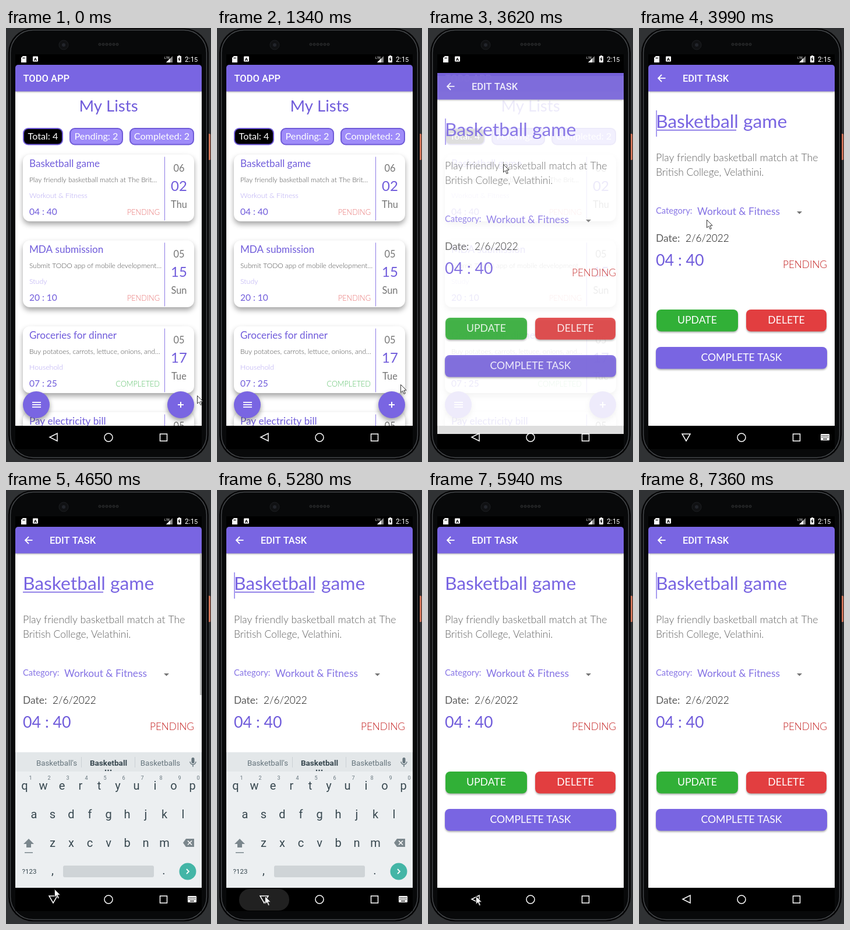
Animation of 352 by 743 pixels, one loop 7.64 s. Source, as an HTML page with a canvas:

```html
<!DOCTYPE html>
<html lang="en">
<head>
<meta charset="utf-8">
<title>Todo app</title>
<style>
html, body { margin: 0; width: 100%; height: 100%; overflow: hidden; background: #303234; }
canvas { display: block; width: 352px; height: 743px; }
</style>
</head>
<body>
<canvas id="stage"></canvas>
<script>
const W = 352, H = 743, LOOP = 7640;
const canvas = document.getElementById('stage');
const c = canvas.getContext('2d');
const ratio = window.devicePixelRatio || 1;
canvas.width = W * ratio;
canvas.height = H * ratio;

const PURPLE = '#7965e2', INK = '#705cdb', GRAY = '#757575';
const HAND = 'Lato, sans-serif', UI = 'Roboto, sans-serif';

// Pointer stops: [time, x, y]; the pointer jumps from one to the next.
const POINTER = [
  [0, 328, 629], [820, 326, 629], [970, 323, 629], [1340, 315, 610],
  [1460, 302, 560], [1610, 270, 470], [1890, 215, 360], [2010, 175, 290],
  [2320, 140, 240], [2470, 129, 233], [3860, 122, 290], [3990, 116, 328],
  [4130, 104, 440], [4260, 94, 560], [4410, 86, 650], [4530, 83, 683],
  [4770, 83, 690], [4920, 82, 695], [6740, 340, 718], [6860, 400, 800]
];
// Stages of the sliding layers: [time, opacity, offset].
const SHEET = [[3620, 0.87, 14], [3740, 0.97, 4], [3860, 1, 0]];
const KEYS = [[4130, 0.6, 22], [4260, 1, 0], [5550, 0.45, 27], [5700, 0, 0]];

const CARDS = [
  ['Basketball game', 'Play friendly basketball match at The Brit…', 'Workout & Fitness', '04 : 40', 'PENDING', '06', '02', 'Thu'],
  ['MDA submission', 'Submit TODO app of mobile development…', 'Study', '20 : 10', 'PENDING', '05', '15', 'Sun'],
  ['Groceries for dinner', 'Buy potatoes, carrots, lettuce, onions, and…', 'Household', '07 : 25', 'COMPLETED', '05', '17', 'Tue'],
  ['Pay electricity bill', '', '', '', '', '05', '', '']
];

const at = (steps, t) => steps.filter(s => s[0] <= t).pop();
const within = (t, a, b) => t >= a && t < b;

function text(str, x, y, size, color, align = 'left', family = HAND, weight = 400) {
  c.font = `${weight} ${size}px ${family}`;
  c.textAlign = align;
  c.fillStyle = color;
  c.fillText(str, x, y);
}

const thin = (str, x, y, size, color, align) => text(str, x, y, size, color, align, HAND, 300);

function rect(x, y, w, h, color) {
  c.fillStyle = color;
  c.fillRect(x, y, w, h);
}

function paint(fill, stroke, line = 1) {
  if (fill) { c.fillStyle = fill; c.fill(); }
  if (stroke) { c.strokeStyle = stroke; c.lineWidth = line; c.stroke(); }
}

function box(x, y, w, h, r, fill, stroke, line) {
  c.beginPath();
  c.roundRect(x, y, w, h, r);
  paint(fill, stroke, line);
}

function disc(x, y, r, fill, stroke, line) {
  c.beginPath();
  c.arc(x, y, r, 0, Math.PI * 2);
  paint(fill, stroke, line);
}

function shape(points, fill, stroke, line, closed = true) {
  c.beginPath();
  points.forEach(([x, y]) => c.lineTo(x, y));
  if (closed) c.closePath();
  paint(fill, stroke, line);
}

function shadowed(blur, drop, alpha, draw) {
  c.save();
  c.shadowColor = `rgba(0,0,0,${alpha})`;
  c.shadowBlur = blur * ratio;
  c.shadowOffsetY = drop * ratio;
  draw();
  c.restore();
}

function blend(alpha, dy, draw) {
  c.save();
  c.globalAlpha = alpha;
  c.translate(0, dy);
  draw();
  c.restore();
}

function phone() {
  rect(0, 0, W, H, '#303234');
  box(346, 181, 5, 45, 1.5, '#cf7357');
  box(4, 0.5, 344, 738, 42, '#050506');
  box(7.5, 3.5, 337, 732, 39, '#08090a', '#45484b', 1.5);
  disc(99, 29, 8, '#101113', '#1d1f22', 1);
  disc(99, 29, 3, '#22252b');
  for (let i = 0; i < 6; i++) disc(161 + i * 6, 28, 2, '#141516', '#303234', 1);
}

function statusBar() {
  rect(16, 45, 320, 18, '#000');
  shape([[29, 48], [35, 48], [35, 59], [26, 59], [26, 51]], '#fff');
  [29, 31.5].forEach(x => rect(x, 50, 1, 3, '#000'));
  box(46, 48.5, 9, 9, 1, '#fff');
  text('A', 50.5, 56, 8, '#000', 'center', UI, 700);
  text('LTE', 272, 53, 6, '#fff', 'left', UI);
  shape([[286, 48], [286, 59], [275, 59]], '#888');
  shape([[282, 52], [282, 59], [275, 59]], '#fff');
  box(294, 48, 7, 11, 1, '#fff');
  rect(296, 47, 3, 1, '#fff');
  shape([[298, 49], [295.5, 54], [297, 54], [296.5, 58], [299.5, 53], [298, 53]], '#000');
  text('2:1', 307, 58, 12, '#fff', 'left', UI);
  text('5', 323, 58, 11, '#fff', 'left', UI);
}

function appBar(title, x) {
  shadowed(3, 1, 0.35, () => box(16, 63, 320, 45.5, [5, 5, 0, 0], PURPLE));
  text(title, x, 92, 16.5, '#fff', 'left', UI, 500);
}

function chip(x, w, label, fill) {
  box(x, 172, w, 27.5, 8, fill, '#6f5bd8', 2);
  text(label, x + w / 2, 191, 16.2, '#fff', 'center');
}

function card([title, note, group, time, status, month, day, weekday], y) {
  shadowed(10, 5, 0.36, () => box(29, y, 294, 114.5, 12, '#fff'));
  text(title, 40, y + 21, 17.1, INK);
  thin(note, 40, y + 47, 12, '#505050');
  thin(group, 40, y + 74, 12.4, '#b3a5f2');
  text(time, 40, y + 103, 15.5, INK);
  thin(status, 264, y + 103, 12.7, status === 'PENDING' ? '#e87272' : '#5fc26d', 'right');
  rect(272, y + 4, 1, 109, '#8c7ae6');
  text(month, 297, y + 29, 16.4, GRAY, 'center');
  text(day, 297, y + 62, 24, INK, 'center');
  text(weekday, 297, y + 91, 16.4, GRAY, 'center');
}

function listScreen() {
  c.save();
  c.beginPath();
  c.rect(16, 63, 320, 618);
  c.clip();
  rect(16, 68, 320, 613, '#fff');
  text('My Lists', 176, 143, 27.6, INK, 'center');
  chip(30, 67, 'Total: 4', '#000');
  chip(110, 90, 'Pending: 2', '#9f8cf9');
  chip(213, 109, 'Completed: 2', '#9f8cf9');
  CARDS.forEach((item, i) => card(item, 216.5 + i * 147));
  [52, 300].forEach(x => shadowed(8, 4, 0.4, () => disc(x, 645, 23, PURPLE)));
  [640, 644, 648].forEach(y => rect(45, y, 15, 1.8, '#fff'));
  rect(295, 644, 10, 2, '#fff');
  rect(299, 640, 2, 10, '#fff');
  c.restore();
  appBar('TODO APP', 29.5);
}

function button(x, y, w, label, fill) {
  shadowed(3, 2, 0.3, () => box(x, y, w, 37.5, 8, fill));
  text(label, x + w / 2, y + 24, 17.6, '#fff', 'center');
}

function editScreen(caret, underline) {
  rect(16, 68, 320, 613, '#fff');
  appBar('EDIT TASK', 75);
  shape([[39, 80], [33, 86], [39, 92]], null, '#fff', 1.8, false);
  rect(33.5, 85, 12, 1.8, '#fff');
  text('Basketball game', 29, 171, 31.8, PURPLE);
  if (underline) rect(29, 174, 138, 1.6, PURPLE);
  if (caret) rect(29, 141, 2, 45, '#a99cf0');
  thin('Play friendly basketball match at The', 29, 228, 17.7, '#606060');
  thin('British College, Velathini.', 29, 253, 17.4, '#606060');
  text('Category:', 29, 318, 14.7, '#8977e6');
  text('Workout & Fitness', 100, 320, 17.3, '#8472e4');
  shape([[271, 314], [280, 314], [275.5, 318.5]], GRAY);
  text('Date:', 29, 366, 17.4, '#5c5c5c');
  thin('2/6/2022', 80, 366, 17.2, '#111');
  text('04 : 40', 29, 407, 26.8, INK);
  thin('PENDING', 323, 411, 17.2, '#c21c1c', 'right');
  button(30, 482, 140, 'UPDATE', '#31b037');
  button(184, 482, 138, 'DELETE', '#e23e40');
  button(29, 546, 294, 'COMPLETE TASK', PURPLE);
}

function keyRow(keys, x, y) {
  [...keys].forEach((key, i) => text(key, x + i * 32, y, 20, '#37474f', 'center', UI));
}

function keyboard() {
  const dark = '#37474f', soft = '#66757d', icon = '#7b878d';
  rect(16, 449, 320, 33, '#e3e7e9');
  rect(16, 482, 320, 199, '#eceff1');
  text("Basketball's", 87, 472, 13.3, soft, 'center', UI);
  text('Basketball', 176, 472, 13.6, dark, 'center', UI, 700);
  text('Basketballs', 265, 472, 13.3, soft, 'center', UI);
  [129, 221].forEach(x => rect(x, 457, 1, 18, '#cbd1d4'));
  [171, 175.5, 180].forEach(x => disc(x, 480, 1.3, dark));
  box(318.5, 458, 5, 10, 2.5, soft);
  c.beginPath();
  c.arc(321, 465, 5, 0, Math.PI);
  paint(null, soft, 1.4);
  rect(320.3, 470, 1.4, 4, soft);

  keyRow('qwertyuiop', 32, 513);
  [...'1234567890'].forEach((n, i) => text(n, 42 + i * 32, 496, 9, soft, 'center', UI));
  keyRow('asdfghjkl', 48, 562);
  keyRow('zxcvbnm', 80, 611);
  shape([[39, 597], [48, 606], [43, 606], [43, 612], [35, 612], [35, 606], [30, 606]], icon);
  rect(32, 620, 14, 1.5, icon);
  shape([[304, 604], [309, 597], [323, 597], [323, 611], [309, 611]], icon);
  shape([[312, 600.5], [319, 607.5]], null, '#fff', 1.5, false);
  shape([[319, 600.5], [312, 607.5]], null, '#fff', 1.5, false);
  text('?123', 40, 657, 11.5, dark, 'center', UI);
  text(',', 80, 658, 20, dark, 'center', UI);
  box(98, 643, 156, 20, 3, '#cfd4d7');
  text('.', 271, 658, 20, dark, 'center', UI);
  disc(312, 653, 14.5, '#43b5a6');
  shape([[310, 649], [314, 653], [310, 657]], null, '#fff', 1.8, false);
}

// "spill" is how far the leaving keyboard overlaps the bar.
function navBar(typing, ripple, spill) {
  rect(16, 681, 320, 40, '#000');
  rect(16, 681, 320, spill, '#565759');
  if (ripple) box(38, 683, 86, 37, 18, `rgba(150,150,150,${ripple})`);
  const back = typing
    ? [[74, 695], [88, 695], [81, 707]]
    : [[88, 694], [88, 707], [75, 700.5]];
  shape(back, null, '#fff', 1.5);
  disc(176, 701, 7, null, '#fff', 1.5);
  box(264.5, 695, 12, 12, 0, null, '#fff', 1.5);
  if (!typing) return;
  box(312, 695, 15, 11, 1, '#fff');
  for (let i = 0; i < 10; i++) {
    rect(313.5 + (i % 5) * 2.6, 697 + Math.floor(i / 5) * 2.8, 1.4, 1.4, '#000');
  }
  rect(316, 703, 7, 1.3, '#000');
}

function pointer(x, y) {
  const arrow = [[0, 0], [0, 13.5], [3.2, 10.6], [5.6, 16], [7.8, 15], [5.4, 9.8], [9.6, 9.6]];
  shape(arrow.map(([a, b]) => [x + a + 0.5, y + b + 0.5]), '#fff', '#333', 1);
}

function render(t) {
  c.setTransform(ratio, 0, 0, ratio, 0, 0);
  const typing = within(t, 3990, 5550);
  const caret = !within(t, 4410, 4920) && !within(t, 5940, 6340) && !within(t, 6740, 7360);
  const ripple = within(t, 5280, 5700) ? 0.22 : 0;
  const [, sheetAlpha, sheetY] = at(SHEET, t) || [0, 0, 0];
  const [, keysAlpha, keysY] = at(KEYS, t) || [0, 0, 0];

  phone();
  statusBar();
  navBar(typing, ripple, 0);
  if (sheetAlpha < 1) listScreen();
  if (sheetAlpha) {
    rect(16, 63, 320, sheetY, '#000');
    blend(sheetAlpha, sheetY, () => editScreen(caret, typing));
  }
  if (keysAlpha) {
    blend(keysAlpha, keysY, keyboard);
    navBar(typing, ripple, keysY);
  }
  if (within(t, 4260, 4920)) rect(333, 109, 2.5, 242, t < 4770 ? '#b5b5b5' : '#dadada');

  const [, x, y] = at(POINTER, t);
  pointer(x, y);
}

const start = performance.now();
function tick() {
  render((performance.now() - start) % LOOP);
  requestAnimationFrame(tick);
}
tick();
</script>
</body>
</html>
```
